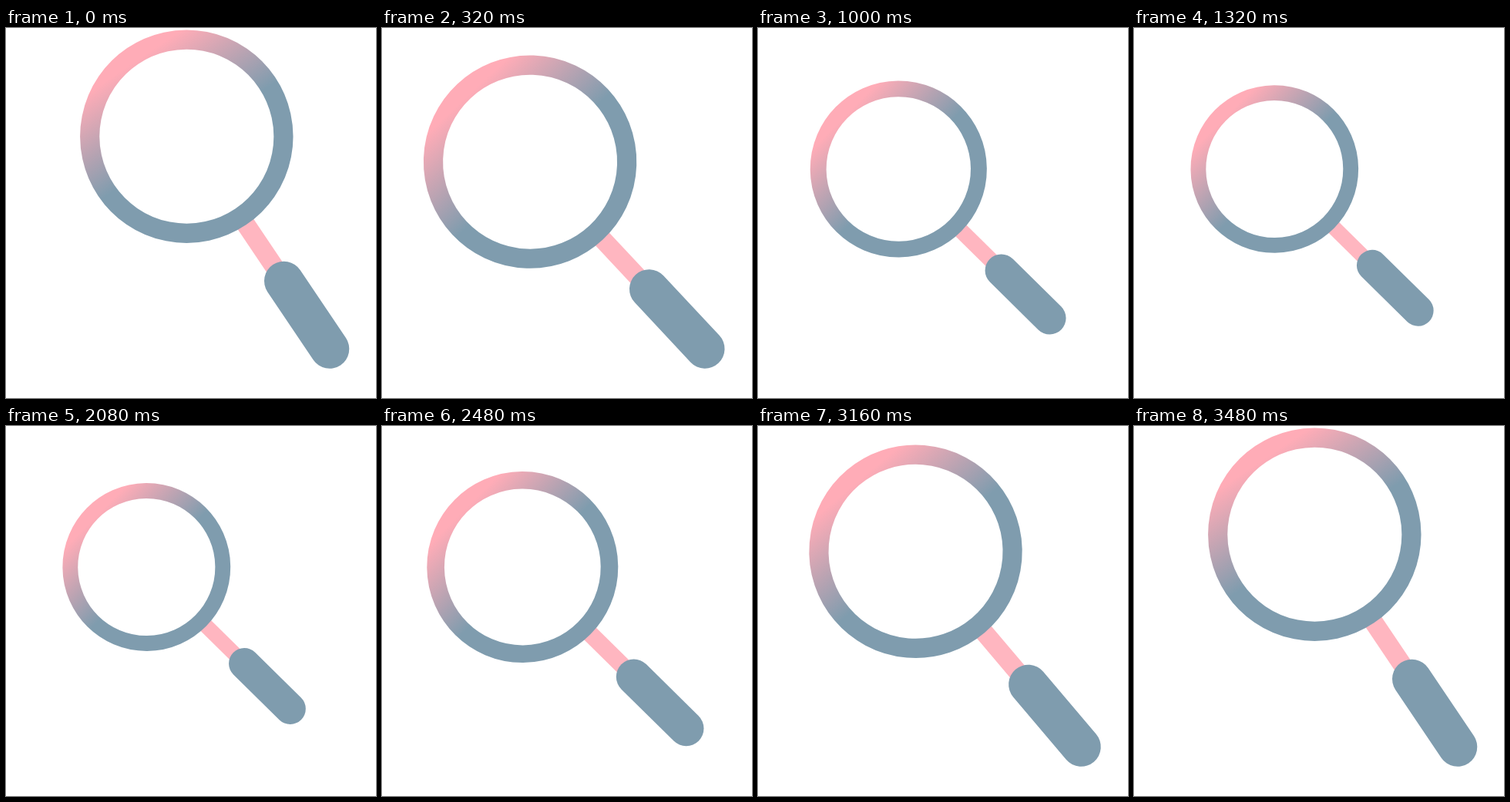
Recreate the animation shown at these times as an HTML page. Size 480 by 480 pixels, loop 4.24 s.

```html
<!DOCTYPE html>
<html lang="en">
<head>
<meta charset="utf-8">
<title>Magnifying glass</title>
<style>
  html, body { margin: 0; width: 100%; height: 100%; overflow: hidden; background: #fff; }
  svg { display: block; width: 100vw; height: 100vh; }
</style>
</head>
<body>
<svg viewBox="0 0 480 480">
  <defs>
    <linearGradient id="shine" gradientUnits="userSpaceOnUse" x1="-118" y1="0" x2="6" y2="0">
      <stop offset="0" stop-color="#ffacb7"/>
      <stop offset="1" stop-color="#7f9cae"/>
    </linearGradient>
  </defs>
  <!-- Drawn along the x axis, with the lens centred on the origin -->
  <g id="glass" fill="none">
    <path d="M122 0H226" stroke="#ffb6c0" stroke-width="24.5"/>
    <circle r="125.6" stroke="url(#shine)" stroke-width="25.2"/>
    <path d="M226 0H332.2" stroke="#7f9cae" stroke-width="51" stroke-linecap="round"/>
  </g>
</svg>
<script>
const LOOP = 4240, STEP = 40;
const TILT = 0.2 * 180 / Math.PI, SHRINK = 0.213;
const glass = document.getElementById('glass');

const clamp = x => Math.min(1, Math.max(0, x));
const inOut = x => (1 - Math.cos(Math.PI * x)) / 2;

// cubic-bezier(.25, .1, .25, 1), solved by bisection
function ease(x) {
  const curve = (a, b, s) => 3 * a * s * (1 - s) ** 2 + 3 * b * s * s * (1 - s) + s ** 3;
  let lo = 0, hi = 1;
  for (let i = 0; i < 24; i++) {
    const mid = (lo + hi) / 2;
    if (curve(.25, .25, mid) < x) lo = mid; else hi = mid;
  }
  return curve(.1, 1, lo);
}

const move = (t, from, to, easing) => easing(clamp((t - from) / (to - from)));

function draw(t) {
  const tilt = TILT * (1 - move(t, 0, 645, ease) + move(t, 2880, 3480, inOut));
  const scale = 1 - SHRINK * (move(t, 640, 1360, ease) - move(t, 2040, 2900, inOut));
  glass.setAttribute('transform',
    `rotate(${tilt} 419 421) translate(182.3 183) rotate(44.6) scale(${scale})`);
}

const start = performance.now();
function tick() {
  const t = (performance.now() - start) % LOOP;
  draw(Math.floor(t / STEP) * STEP);
  requestAnimationFrame(tick);
}
tick();
</script>
</body>
</html>
```
